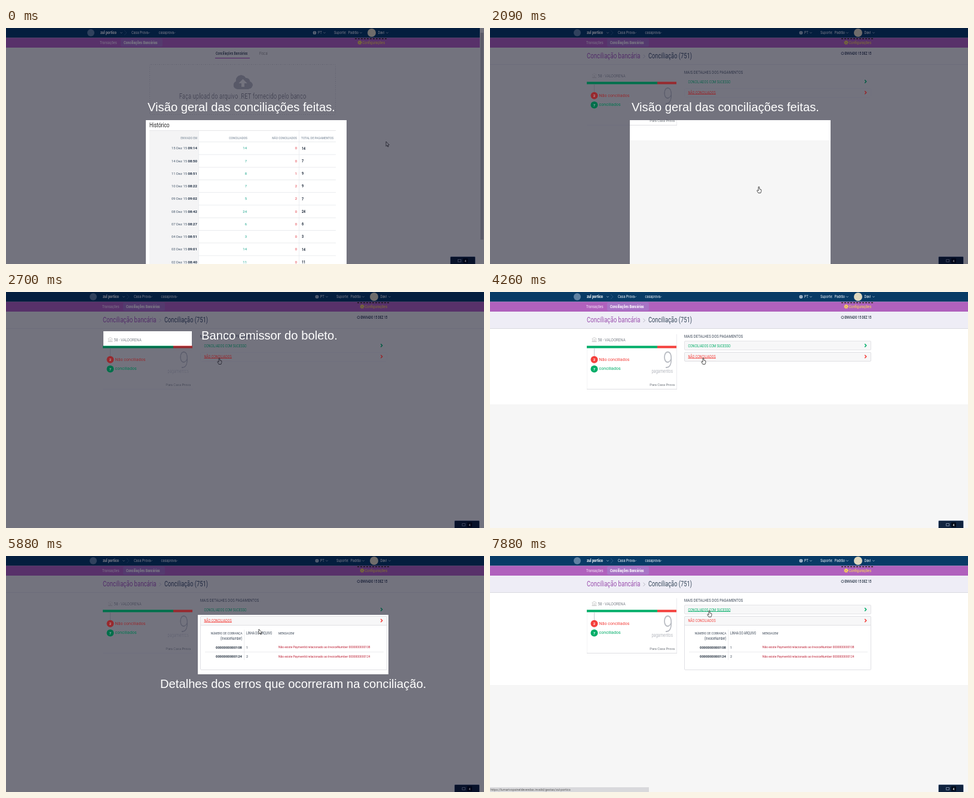
Write an HTML page with a canvas that moves like this. It is 800 px wide and 397 px high and loops after 8 s.

```html
<!DOCTYPE html>
<html lang="pt">
<head>
<meta charset="utf-8">
<style>
html, body { margin: 0; width: 100%; height: 100%; overflow: hidden; background: #fff; }
canvas { display: block; width: 800px; height: 397px; }
</style>
</head>
<body>
<canvas id="stage" width="800" height="397"></canvas>
<script>
const W = 800, H = 397, LOOP = 8000;
const UI = 'Roboto, "Open Sans", sans-serif';
const NARROW = 0.77;
const GREEN = '#00ad68', RED = '#f4403c', NAVY = '#083b66', INK = '#3a4656';
const stage = document.getElementById('stage').getContext('2d');
const page = document.createElement('canvas');
page.width = W;
page.height = H;
let c = page.getContext('2d');

const ROWS = [
  ['15', '09:14', 14, 0], ['14', '08:50', 7, 0], ['11', '08:51', 8, 1],
  ['10', '08:22', 7, 2], ['09', '09:02', 5, 2], ['08', '08:42', 24, 0],
  ['07', '08:27', 6, 0], ['04', '08:51', 3, 0], ['03', '09:01', 14, 0],
  ['02', '08:40', 11, 0]
];
const CALLOUTS = [
  { from: 0, to: 2190, box: [234, 155, 336, 242], text: 'Visão geral das conciliações feitas.', x: 237, y: 140 },
  { from: 2700, to: 4260, box: [163, 66, 148, 25], text: 'Banco emissor do boleto.', x: 327, y: 80 },
  { from: 5590, to: 7300, box: [321, 99, 319, 100], text: 'Detalhes dos erros que ocorreram na conciliação.', x: 258, y: 222 }
];
// start, end, from x, y, to x, y
const MOVES = [
  [1490, 2060, 636, 191, 450, 267],
  [2190, 2670, 450, 267, 357, 111],
  [5150, 5590, 357, 111, 427, 124],
  [5750, 6270, 427, 124, 364, 109],
  [7150, 7270, 364, 109, 367, 92]
];

const clamp = v => Math.max(0, Math.min(1, v));
const span = (t, a, b) => clamp((t - a) / (b - a));
const ease = p => p < 0.5 ? 4 * p ** 3 : 1 - (2 - 2 * p) ** 3 / 2;

function rect(x, y, w, h, color) {
  c.fillStyle = color;
  c.fillRect(x, y, w, h);
}
function line(points, color, width = 1) {
  c.beginPath();
  points.forEach(([x, y]) => c.lineTo(x, y));
  c.strokeStyle = color;
  c.lineWidth = width;
  c.stroke();
}
function disc(x, y, r, color) {
  c.beginPath();
  c.arc(x, y, r, 0, 7);
  c.fillStyle = color;
  c.fill();
}
function box(x, y, w, h, fill, border) {
  c.beginPath();
  c.roundRect(x, y, w, h, 1.5);
  c.fillStyle = fill;
  c.fill();
  c.strokeStyle = border;
  c.lineWidth = 1;
  c.stroke();
}
function write(s, x, y, size, color, align, font, weight, sx) {
  c.save();
  c.translate(x, y);
  c.scale(sx, 1);
  c.font = `${weight} ${size}px ${font}`;
  c.textAlign = align;
  c.fillStyle = color;
  c.fillText(s, 0, 0);
  c.restore();
}
const ui = (s, x, y, size, color, weight = 400, align = 'left') => write(s, x, y, size, color, align, UI, weight, NARROW);
const body = (s, x, y, size, color, weight = 400, align = 'left') => write(s, x, y, size, color, align, UI, weight, 1);
const down = (x, y, color = '#9fb6cc') => line([[x - 1.8, y - 0.9], [x, y + 0.9], [x + 1.8, y - 0.9]], color, 0.8);
const right = (x, y, s, color, w) => line([[x - s / 2, y - s], [x + s / 2, y], [x - s / 2, y + s]], color, w);

function header() {
  rect(0, 0, W, 16.5, NAVY);
  rect(0, 16.5, W, 16.5, '#b061bd');
  disc(146, 8, 6, '#5f82a3');
  ui('zul portico', 162, 10.4, 7.3, '#fff', 700);
  ui('Casa Prova', 214, 10.4, 7.2, '#e8eef5');
  ui('casaprova', 259.5, 10.4, 7.2, '#e8eef5');
  right(204, 8, 4, '#2c5a84', 1);
  [197, 243, 285.5, 537, 598, 642].forEach(x => down(x, 8));
  disc(520.5, 8, 2.8, '#d6e2ee');
  line([[518, 8], [523, 8]], NAVY, 0.5);
  line([[520.5, 5], [520.5, 11]], NAVY, 0.5);
  ui('PT', 526, 10.4, 7, '#e8eef5');
  ui('Suporte:  Padrão', 553, 10.4, 7.2, '#e8eef5');
  disc(616, 8, 7, '#ded8bf');
  ui('Davi', 626.5, 10.4, 7.2, '#fff');
  ui('Transações', 161, 27, 7.2, '#f3e3f6');
  box(196.5, 18, 69, 13, '#a874c6', '#a874c6');
  ui('Conciliações Bancárias', 201, 27, 7, '#fff', 700);
  c.setLineDash([3, 2]);
  line([[588, 18], [643, 18]], '#2b2417', 1.6);
  c.setLineDash([]);
  disc(596, 24.5, 2.4, '#ffe14d');
  c.setLineDash([1.2, 1.1]);
  c.beginPath();
  c.arc(596, 24.5, 2.9, 0, 7);
  c.strokeStyle = '#ffe14d';
  c.stroke();
  c.setLineDash([]);
  disc(596, 24.5, 1, '#b061bd');
  ui('Configurações', 600.5, 27, 7.6, '#ffe14d');
}

function chat(x) {
  box(x, 384.5, 42, 14, '#10233f', '#a9b4c6');
  c.strokeStyle = '#8d9cb5';
  c.lineWidth = 0.8;
  c.strokeRect(x + 13, 389.5, 5, 4);
  rect(x + 21.5, 387.5, 8, 8, '#000a18');
  ui('4', x + 24, 393.6, 6, '#fff', 700);
}

function cloud(x, y) {
  [[-9, 5, 7], [-3, -3, 9], [6, -1, 6], [10, 5, 6.5]].forEach(([dx, dy, r]) => disc(x + dx, y + dy, r, '#b0b1b9'));
  rect(x - 9, y + 2, 19, 10, '#b0b1b9');
  c.beginPath();
  [[0, -5], [7, 2], [2.5, 2], [2.5, 8], [-2.5, 8], [-2.5, 2], [-7, 2]].forEach(([dx, dy]) => c.lineTo(x + dx, y + dy));
  c.fillStyle = '#fff';
  c.fill();
}

function listPage() {
  rect(0, 0, W, H, '#fff');
  c.save();
  c.translate(-4, 0);
  header();
  c.restore();
  ui('Conciliações Bancárias', 351, 45, 6.6, INK, 700);
  rect(350, 50, 58, 1.4, '#a45bb4');
  ui('Fiscal', 424, 45, 7.2, '#777');
  c.setLineDash([2, 1.5]);
  box(240.5, 61.5, 311, 84, '#fafafb', '#cacad0');
  c.setLineDash([]);
  cloud(396.5, 91);
  ui('Faça upload do arquivo .RET fornecido pelo banco', 396, 119, 12.4, '#83848c', 400, 'center');

  ui('Histórico', 240, 166.5, 10.8, '#222');
  rect(240, 173, 82, 224, '#f4f4f5');
  rect(240, 172, 312, 1, '#e6e6e8');
  [322, 490].forEach(x => rect(x, 173, 0.7, 224, '#e6e9ec'));
  const head = '#9aa5b1';
  ui('ENVIADO EM', 320, 187, 6.1, head, 700, 'right');
  ui('CONCILIADOS', 404, 187, 6.2, head, 700, 'right');
  ui('NÃO CONCILIADOS', 487, 187, 6.2, head, 700, 'right');
  ui('TOTAL DE PAGAMENTOS', 494, 187, 6.2, head, 700);
  ROWS.forEach(([day, hour, ok, bad], i) => {
    const y = 204.3 + i * 21.25;
    rect(322, y - 13, 230, 0.8, '#e4e7ea');
    body(`${day} Dez 15`, 303, y, 5.9, '#46586c', 400, 'right');
    body(hour, 320, y, 6, '#1d2d42', 700, 'right');
    body(ok, 403, y, 6, '#1aa58c', 400, 'right');
    body(bad, 487, y, 6, '#e0323c', 400, 'right');
    ui(ok + bad, 495, y + 0.3, 7, '#1b2738', 700);
  });
  rect(793, 0, 7, H, '#f0f0f0');
  rect(794, 8, 5, 348, '#b6b6ba');
  chat(743.5);
}

function bar() {
  rect(162, 90.5, 118, 4, GREEN);
  rect(280, 90.5, 32, 4, RED);
}
function badges() {
  disc(174.5, 113.8, 6, RED);
  disc(174.5, 129.6, 6, GREEN);
  body('2', 174.5, 116, 6, '#fff', 700, 'center');
  body('7', 174.5, 131.8, 6, '#fff', 700, 'center');
  body('Não conciliados', 182.5, 115.6, 7.1, RED);
  body('conciliados', 182.5, 131.4, 7.1, GREEN);
}
function redLink(t) {
  ui('NÃO CONCILIADOS', 331.5, 111, 6.9, RED);
  if (t < 7880) rect(331.5, 111.2, 46.5, 0.8, RED);
  right(628.5, 108.6, 2.6, RED, 1.5);
}

function errorTable() {
  ui('NÚMERO DE COBRANÇA', 395.5, 132, 6.2, INK, 400, 'right');
  ui('(InvoiceNumber)', 395.5, 140.5, 6.4, INK, 400, 'right');
  ui('LINHA DO ARQUIVO', 402, 132, 6.3, INK);
  ui('MENSAGEM', 456, 132, 6.2, INK);
  rect(398.5, 124, 0.7, 51, '#dfe2e6');
  rect(333, 161, 299, 0.8, '#e6e8ea');
  ['0000000000108', '0000000000124'].forEach((id, i) => {
    const y = 155.6 + i * 15.3;
    body(id, 395, y, 5.9, '#24303f', 700, 'right');
    body(i + 1, 402, y, 5.6, INK);
    body(`Não existe PaymentId relacionado ao InvoiceNumber ${id}`, 456, y - 0.3, 4.95, '#bd2035');
  });
}

function detailPage(t) {
  const open = ease(span(t, 4840, 5190));
  rect(0, 0, W, H, '#f6f6f6');
  rect(0, 32, W, 157 + 28 * open, '#fff');
  rect(0, 32, W, 29.5, '#eeedf6');
  rect(0, 61, W, 1, '#d9d9e0');
  header();
  ui('Conciliação bancária', 162, 51.3, 12.5, '#9a4fae');
  right(258, 47.8, 3, '#b5b5c0', 1);
  ui('Conciliação (751)', 265, 51.3, 12.1, '#35475a');
  c.beginPath();
  c.arc(590, 42.7, 2.1, 0, 7);
  c.strokeStyle = INK;
  c.lineWidth = 0.9;
  c.stroke();
  ui('ENVIADO 15 DEZ 15', 593.5, 45, 6.4, INK, 700);

  rect(162, 70, 150.5, 93.5, '#fff');
  rect(162, 163, 151, 1, '#dedee2');
  rect(312, 71, 0.8, 92, '#e6e6ea');
  rect(162, 94, 0.6, 69, '#ececf0');
  line([[170.5, 79], [174.5, 76.5], [178.5, 79]], '#bbb', 0.8);
  [172, 174.5, 177].forEach(x => rect(x - 0.5, 79.5, 1, 3, '#bbb'));
  rect(170.5, 83, 8, 0.9, '#bbb');
  ui('58 - VALDORENA', 180.5, 82.6, 7.9, '#7d838b');
  bar();
  rect(174, 94.5, 0.8, 14, '#b9bdc3');
  badges();
  ui('9', 306, 128, 38, '#b7bac1', 300, 'right');
  ui('pagamentos', 306, 135.5, 8.3, '#b7bac1', 400, 'right');
  body('Para Casa Prova', 309, 157.5, 5.7, '#6d737b', 400, 'right');

  ui('MAIS DETALHES DOS PAGAMENTOS', 325, 76.8, 7.75, INK);
  box(325.5, 82.5, 312, 15, '#f7f7f8', '#e4e4e7');
  ui('CONCILIADOS COM SUCESSO', 331.5, 92.6, 6.9, GREEN);
  if (t >= 7300) rect(331.5, 93.2, 71, 0.8, GREEN);
  right(628.5, 90, 2.6, GREEN, 1.5);
  if (open > 0) {
    c.save();
    c.beginPath();
    c.rect(320, 116, 325, 1 + 75.5 * open);
    c.clip();
    box(325.5, 110, 312, 7 + 74.5 * open, '#fff', '#e0e0e4');
    errorTable();
    c.restore();
  }
  box(325.5, 101.5, 312, 15, '#f7f7f8', '#e0e0e4');
  redLink(t);
  chat(750.5);

  c.globalAlpha = span(t, 6400, 6520);
  if (c.globalAlpha > 0) {
    rect(0, 389, 266, 8, '#d9d9dc');
    body('https://lumarivopaineldevendas.invalid/gestao/zul-portico', 1, 395, 5.2, '#555');
  }
  c.globalAlpha = 1;
}

function cursor(t) {
  let x = MOVES[0][2], y = MOVES[0][3];
  for (const [a, b, x0, y0, x1, y1] of MOVES) {
    if (t < a) break;
    const p = ease(span(t, a, b));
    x = x0 + (x1 - x0) * p;
    y = y0 + (y1 - y0) * p;
  }
  const hand = t < 2190 ? x < 552 && y > 191 : y < 117;
  const arrow = [[0, 0], [0, 8], [1.9, 6.4], [3, 9], [4.2, 8.5], [3.1, 6], [5.5, 5.8]];
  const palm = [[-0.8, 0.2], [0.8, 0.2], [1, 4], [3.8, 4.8], [4, 7.5], [3, 10.5], [-1, 10.5], [-3.3, 6.5], [-2.4, 5.7], [-0.9, 7]];
  c.beginPath();
  (hand ? palm : arrow).forEach(([dx, dy]) => c.lineTo(x + dx, y + dy));
  c.closePath();
  c.fillStyle = '#fff';
  c.fill();
  c.strokeStyle = '#222';
  c.lineWidth = 0.8;
  c.lineJoin = 'round';
  c.stroke();
}

function spotlight(t, { box: [x, y, w, h], text, x: tx, y: ty }) {
  // the brightening melts the pale greys into one flat tone
  stage.filter = 'blur(0.6px) brightness(1.12)';
  stage.drawImage(page, 0, 0);
  stage.filter = 'none';
  c = stage;
  rect(0, 0, W, H, 'rgba(0, 0, 20, 0.55)');
  // keep the saturated accents glowing through the shade
  if (t >= 2090) {
    c.globalAlpha = 0.28;
    bar();
    badges();
    redLink(t);
    c.globalAlpha = 1;
  }
  stage.drawImage(page, x, y, w, h, x, y, w, h);
  write(text, tx, ty, 20.2, '#fff', 'left', '"Liberation Sans", Arial, sans-serif', 400, 1);
}

function draw(now) {
  const t = now % LOOP;
  c = page.getContext('2d');
  if (t < 2090) listPage();
  else detailPage(t);
  cursor(t);
  const callout = CALLOUTS.find(o => t >= o.from && t < o.to);
  if (callout) spotlight(t, callout);
  else stage.drawImage(page, 0, 0);
}

let start;
function tick(now) {
  start ??= now;
  draw(now - start);
  requestAnimationFrame(tick);
}
requestAnimationFrame(tick);
</script>
</body>
</html>
```
